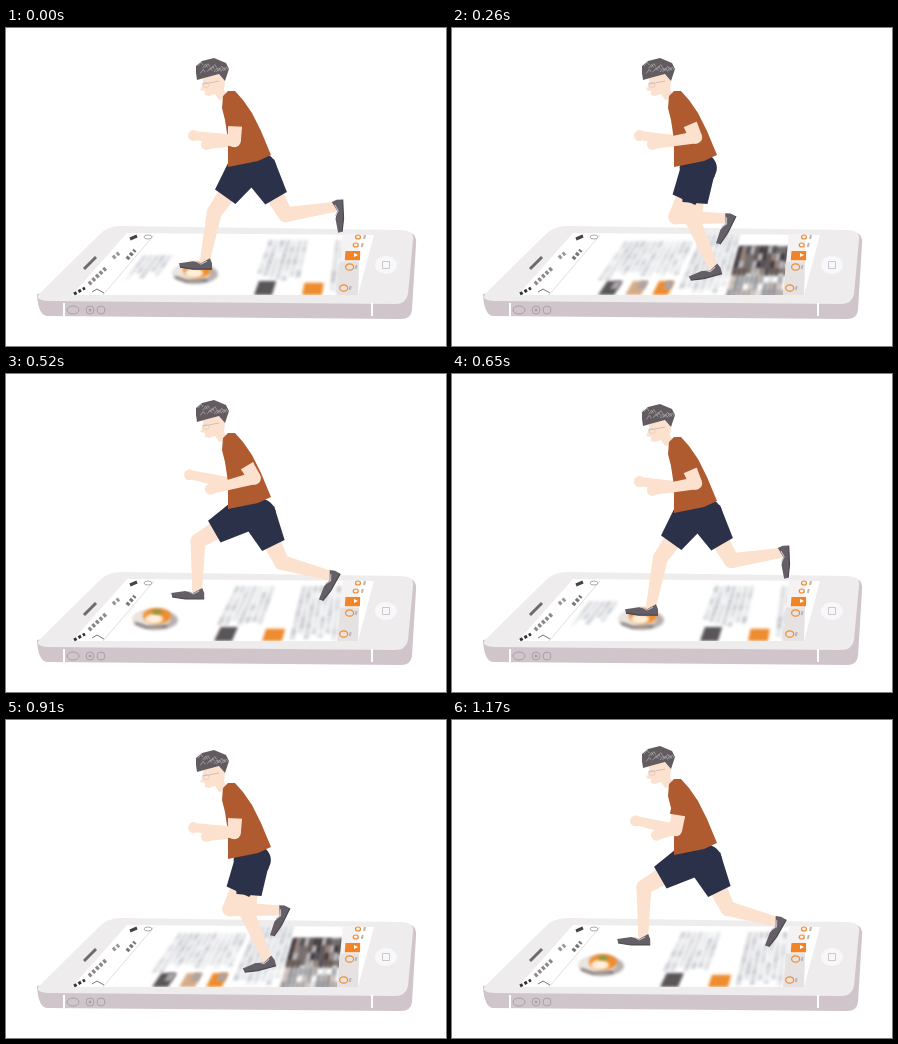
An HTML page with a canvas that plays this animation: 440x318 px, repeating every 1.3 s.

```html
<!DOCTYPE html>
<html lang="en">
<head>
<meta charset="utf-8">
<title>Runner on a phone</title>
<style>
html, body { margin: 0; width: 100%; height: 100%; overflow: hidden; background: #fff; }
canvas { display: block; }
</style>
</head>
<body>
<canvas id="stage" width="440" height="318"></canvas>
<script>
const ctx = document.getElementById('stage').getContext('2d');
const { PI, sin, cos, hypot, atan2, min, sqrt } = Math;
const STEP = 130, THIGH = 54, SHIN = 49;
const SKIN = '#fce2ce', SHIRT = '#b05a30', NAVY = '#2b3148', SHOE = '#645f66';
const HAIR = '#625c61', ORANGE = '#ee8c30', DARK = '#5a5558', TAN = '#d5ab88';

const mix = (a, b, t) => a + (b - a) * t;

function random(seed) {
  return () => (seed = seed * 16807 % 2147483647) / 2147483647;
}

function trace(points) {
  ctx.beginPath();
  for (let i = 0; i < points.length; i += 2) ctx.lineTo(points[i], points[i + 1]);
}

function poly(points, color) {
  trace(points);
  ctx.fillStyle = color;
  ctx.fill();
}

function line(points, color, width) {
  trace(points);
  ctx.strokeStyle = color;
  ctx.lineWidth = width;
  ctx.stroke();
}

function oval(x, y, rx, ry, color, width) {
  ctx.beginPath();
  ctx.ellipse(x, y, rx, ry, 0, 0, 7);
  ctx.fillStyle = ctx.strokeStyle = color;
  ctx.lineWidth = width || 0;
  width ? ctx.stroke() : ctx.fill();
}

// Tapered segment with flat ends.
function taper(x1, y1, r1, x2, y2, r2, color) {
  const a = atan2(y2 - y1, x2 - x1), s = sin(a), c = cos(a);
  poly([x1 - s * r1, y1 + c * r1, x2 - s * r2, y2 + c * r2,
        x2 + s * r2, y2 - c * r2, x1 + s * r1, y1 - c * r1], color);
}

function limb(x1, y1, r1, x2, y2, r2, color) {
  taper(x1, y1, r1, x2, y2, r2, color);
  oval(x1, y1, r1, r1, color);
  oval(x2, y2, r2, r2, color);
}

// Slanted block lying on the screen; x is measured on its lower edge.
function tile(x1, x2, top, bottom, color) {
  const at = (x, v) => x + (1 - v) * (50 - 44 * (x - 98) / 232);
  const y1 = 206 + 61 * top, y2 = 206 + 61 * bottom;
  poly([at(x1, top), y1, at(x2, top), y1, at(x2, bottom), y2, at(x1, bottom), y2], color);
}

function drawPhone() {
  ctx.beginPath();
  ctx.moveTo(31, 266);
  ctx.lineTo(404, 205);
  ctx.quadraticCurveTo(411, 206, 410, 216);
  ctx.lineTo(406, 282);
  ctx.quadraticCurveTo(405, 291, 395, 291);
  ctx.lineTo(42, 288);
  ctx.quadraticCurveTo(32, 288, 31, 266);
  ctx.fillStyle = '#cfc5ca';
  ctx.fill();
  ctx.beginPath();
  ctx.moveTo(34, 265);
  ctx.lineTo(93, 207);
  ctx.quadraticCurveTo(101, 198, 116, 198);
  ctx.lineTo(394, 202);
  ctx.quadraticCurveTo(409, 202, 407, 212);
  ctx.lineTo(402, 266);
  ctx.quadraticCurveTo(400, 276, 389, 276);
  ctx.lineTo(43, 273);
  ctx.quadraticCurveTo(27, 272, 34, 265);
  ctx.fillStyle = '#efecee';
  ctx.fill();
  poly([121,205, 368,207, 352,267, 66,267], '#fff');
  for (const x of [58, 366]) line([x, 275, x, 288], '#fff', 2);
  for (const x of [67, 84, 95]) oval(x, 282, x < 70 ? 6 : 4, 4, '#aaa0a8', 1);
  oval(84, 282, 1.5, 1.5, '#aaa0a8');
  oval(380, 237, 11, 9, '#f8f7f9');
  ctx.lineWidth = 1;
  ctx.strokeStyle = '#cbc7cc';
  ctx.strokeRect(376.5, 233.5, 7, 7);
}

function drawBars() {
  line([78,241, 90,229], '#706a70', 3);
  line([148,207, 97,267], '#e0dee1', 1);
  ctx.setLineDash([3, 2]);
  line([68,266, 79,260], '#333', 3);
  line([83,256, 101,239], '#8c888d', 4);
  line([107,230, 113,225], '#999', 4);
  line([121,231, 129,222], '#777', 4);
  ctx.setLineDash([]);
  line([124,211, 131,208], '#444', 3);
  oval(142, 209, 4, 2, '#aaa', 1);
  line([86,264, 91,261, 98,265], '#777', 1);

  tile(331, 352, 0, 1, '#f4f2f2');
  tile(331, 352, .45, 1, '#e6e2e2');
  tile(336, 353, .28, .43, '#f08426');
  poly([348,225, 352,227, 348,229], '#fff');
  for (const y of [209, 217, 239, 260]) {
    const x = 352 - (y - 209) * .28, r = y > 230 ? 4 : 2.5;
    oval(x, y, r, r * .8, ORANGE, 1.2);
    line([x + 7, y - 2, x + 6, y + 2], '#b9b5b8', 2);
  }
}

// Column of blurred text strips.
function textBlock(x, width, top, bottom, rnd) {
  for (let i = 0; i < width; i += 7) {
    const end = bottom - rnd() * .15;
    for (let v = top; v < end; v += .1)
      tile(x + i, x + i + 5, v, min(v + .1, end), `rgba(140,145,157,${.12 + rnd() * .38})`);
  }
}

function photo(x, rnd) {
  const tones = ['#39343a', '#655855', '#a08a7e', '#c5c3c6', '#4a4e58'];
  tile(x, x + 56, .2, .65, '#77706f');
  for (let i = 0; i < 56; i += 5)
    for (let v = .2; v < .94; v += .12) {
      ctx.globalAlpha = v < .6 ? .9 : .5;
      if (rnd() < .8) tile(x + i, x + i + 5, v, v + .13, tones[Math.floor(rnd() * 5)]);
    }
  ctx.globalAlpha = 1;
}

function bowl(x) {
  oval(x + 3, 246, 22, 10, '#b8b0ae');
  oval(x - 2, 245, 19, 9, '#ece6e1');
  oval(x + 4, 242, 14, 8, ORANGE);
  oval(x + 1, 245, 9, 5, '#fff0dc');
  oval(x + 4, 238, 5, 2, '#7c9b45');
  line([x - 18, 249, x - 6, 253, x + 14, 252], '#655d5c', 2);
}

// The page with the bowl scrolls for two steps, the photo page stays for three.
function drawPage(step) {
  const phase = (step + 1) % 5, rnd = random(phase * 977 + 31);
  ctx.save();
  trace([150,206, 341,206, 333,267, 100,267]);
  ctx.clip();
  ctx.filter = 'blur(1.5px)';
  if (phase < 2) {
    const shift = 40 * phase;
    textBlock(66 + shift, 35, .35, .75, rnd);
    textBlock(203 + shift, 46, .1, .78, rnd);
    textBlock(283 + shift, 50, .1, 1, rnd);
    tile(208 + shift, 226 + shift, .77, 1, DARK);
    tile(256 + shift, 276 + shift, .8, 1, ORANGE);
    bowl(147 + shift);
  } else {
    const shift = -5 * (phase - 2);
    textBlock(140 + shift, 84, .12, .76, rnd);
    textBlock(229 + shift, 48, 0, 1, rnd);
    [DARK, TAN, ORANGE].forEach((color, i) => {
      const x = 151 + shift + 27 * i;
      tile(x, x + 16, .77, 1, color);
      tile(x + 8, x + 16, .77, .9, '#a9a4a8');
    });
    photo(279 + shift, rnd);
  }
  ctx.restore();
}

// Ankle and shoe angle over a stride of ten steps: five on the ground, five in the air.
function footAt(phase) {
  if (phase < 5) return { x: 199 + 31 * phase, y: 241.5 - 5.5 * (phase - 1.3) ** 2, angle: -3.8 * phase ** 2 };
  const swing = phase - 5, lift = cos((swing - .6) * PI / 3.4);
  return { x: 328 - 21 * swing - 3.3 * swing ** 2, y: 196 - 20 * lift, angle: -50 - 50 * lift };
}

// Hip follows the foot a little; the knee is bent forward to join the two.
function legAt(phase) {
  const foot = footAt(phase);
  const hip = { x: mix(244, foot.x, .1), y: 140 };
  const dx = foot.x - hip.x, dy = foot.y - hip.y;
  const reach = min(hypot(dx, dy), THIGH + SHIN);
  const along = (reach ** 2 + THIGH ** 2 - SHIN ** 2) / (2 * reach);
  const bend = sqrt(THIGH ** 2 - along ** 2);
  const knee = { x: hip.x + (dx * along - dy * bend) / reach, y: hip.y + (dy * along + dx * bend) / reach };
  return { hip, knee, foot };
}

function drawLeg({ hip, knee, foot }) {
  limb(hip.x, hip.y, 11, knee.x, knee.y, 7.5, SKIN);
  limb(knee.x, knee.y, 7.5, foot.x, foot.y, 5, SKIN);
  ctx.save();
  ctx.translate(foot.x, foot.y);
  ctx.rotate(foot.angle * PI / 180);
  poly([-12,1, -4,3, 5,-2, 7,3, 7,9, -12,9, -25,7, -26,3], SHOE);
  line([7,9, -12,9, -25,7], '#4b474e', 1.2);
  line([-9,1, -4,4, 2,1], '#c9c3c8', 1);
  ctx.restore();
}

function drawShorts({ hip, knee }) {
  oval(hip.x, hip.y, 18, 16, NAVY);
  taper(hip.x, hip.y, 18, mix(hip.x, knee.x, .65), mix(hip.y, knee.y, .65), 12.5, NAVY);
}

function drawHead() {
  poly([197,50, 214,46, 219,53, 218,62, 224,70, 213,72, 209,66, 203,68, 199,67, 199,63, 194,62, 197,56], SKIN);
  poly([190,38, 196,33, 208,30, 220,35, 223,41, 219,53, 213,46, 198,50, 191,52, 190,45], HAIR);
  const rnd = random(7);
  for (let i = 0; i < 12; i++) {
    const x = 192 + i * 2.3, y = 34 + rnd() * 8;
    line([x, y + 4, x + 3, y, x + 5, y + 3], '#b3aeb2', .7);
  }
  line([196,56, 203,55, 213,53], '#c4b6b1', .8);
  oval(200, 57, 3, 2.5, '#d9c8be', .7);
}

const handAt = swing => [196 + 11 * swing, 112 + 7.5 * swing];

function drawForearm(x, y, swing) {
  const [hx, hy] = handAt(swing);
  limb(x, y, 6, hx, hy, 4.5, SKIN);
  oval(hx - 2, hy, 5.5, 5.5, SKIN);
}

function drawNearArm(swing) {
  const sx = 230, sy = 77, ex = 236 + 13 * swing, ey = 111 - 3 * swing;
  const cx = mix(sx, ex, .6), cy = mix(sy, ey, .6);
  limb(cx, cy, 7, ex, ey, 6.5, SKIN);
  drawForearm(ex, ey, swing);
  taper(sx, sy, 7, cx, cy, 8.5, SHIRT);
}

function drawRunner(step) {
  const back = legAt(step % 5 + 5), front = legAt(step % 5);
  const [rear, lead] = step % 5 === 4 ? [front, legAt(9)] : [back, front];
  const swing = sin((step - 1) * PI / 5);
  const rise = step % 5 === 4 ? -4 : 0;
  drawLeg(rear);
  drawLeg(lead);
  drawShorts(rear);
  drawShorts(lead);
  ctx.save();
  ctx.translate(0, rise);
  drawForearm(222, 113, -swing);
  drawHead();
  poly([217,68, 222,63, 229,63, 237,72, 246,85, 255,103, 265,127, 252,133, 222,139, 222,112, 219,92, 216,80], SHIRT);
  drawNearArm(swing);
  ctx.restore();
}

function draw(now) {
  const step = Math.floor(now / STEP) % 10;
  ctx.clearRect(0, 0, 440, 318);
  drawPhone();
  drawPage(step);
  drawBars();
  drawRunner(step);
  requestAnimationFrame(draw);
}

ctx.lineJoin = 'round';
requestAnimationFrame(draw);
</script>
</body>
</html>
```
